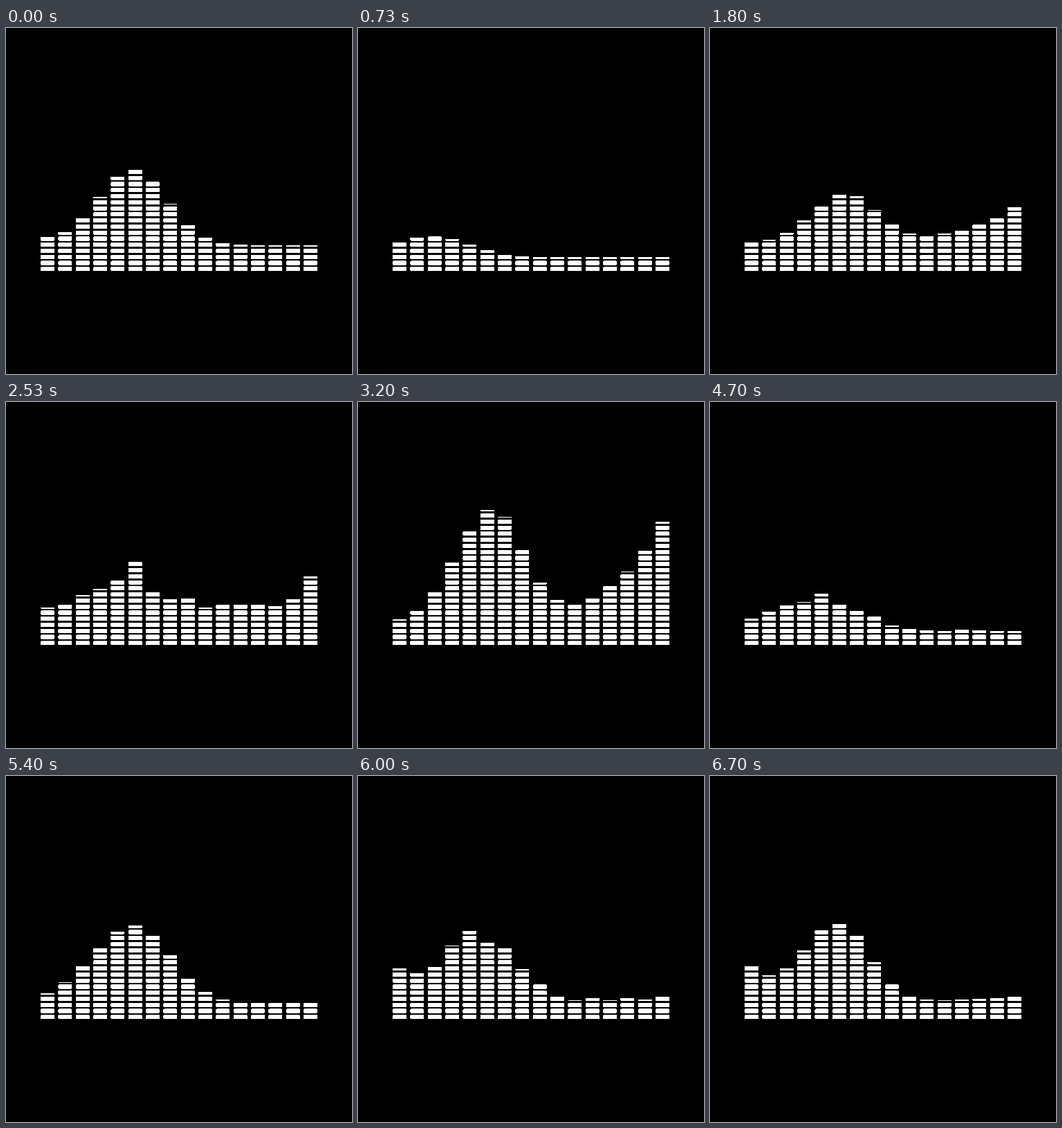
An HTML page that plays this animation: 500 px wide and 500 px high, repeating every 6.73 s.

```html
<!DOCTYPE html>
<html lang="en">
<head>
<meta charset="utf-8">
<title>Equalizer</title>
<style>
  html, body { margin: 0; width: 100%; height: 100%; overflow: hidden; background: #000; }
  svg { display: block; width: 100vw; height: 100vh; shape-rendering: crispEdges; }
</style>
</head>
<body>
<svg viewBox="0 0 500 500"></svg>
<script>
const LOOP = 6730, BEAT = 700, BASE = 351, BARS = 16, ROWS = 28;
const svg = document.querySelector('svg');

// Bar heights: a bell around bar `at`, plus lifts that fade in from both ends.
function pose({ floor, amp, at, rise, fall, left = 0, right = 0 }) {
  return Array.from({ length: BARS }, (_, i) => {
    const width = i < at ? rise : fall;
    return floor + amp * Math.exp(-(((i - at) / width) ** 2))
      + left * Math.exp(-i / 1.5) + right * Math.exp((i - BARS + 1) / 3);
  });
}

const hill = pose({ floor: 37, amp: 109, at: 4.9, rise: 2.8, fall: 2.7, left: 7 });
const valley = pose({ floor: 40, amp: 70, at: 5.4, rise: 2.7, fall: 2.4, right: 52 });
const loud = pose({ floor: 30, amp: 161, at: 5.3, rise: 2.9, fall: 2.4, right: 148 });
const dome = pose({ floor: 22, amp: 113, at: 5, rise: 3.5, fall: 2.9, right: 3 });
const lift = pose({ floor: 25, amp: 113, at: 5, rise: 2.8, fall: 2.4, left: 46, right: 7 });
const hush = pose({ floor: 20, amp: 30, at: 1.8, rise: 3, fall: 3 });
const calm = pose({ floor: 20, amp: 25, at: 2.2, rise: 4.3, fall: 4.3, right: 4 });

const scale = (bars, k) => bars.map(h => h * k);
const key = (time, bars) => ({ time, bars });

const keys = [
  key(0, hill), key(730, hush), key(1800, valley), key(3200, loud),
  key(4000, calm), key(5400, dome), key(6700, lift), key(LOOP, hill)
];

// Every beat swells to its peak level and drops back before the next one.
const swells = [hill, valley, loud, dome, lift];
const peaks = [154, 213, 190, 190, 215, 188, 234, 190, 190, 146];
peaks.forEach((peak, n) => {
  const bars = swells[n >> 1];
  keys.push(key(n * BEAT + 250, scale(bars, peak / Math.max(...bars))));
  if (n) keys.push(key(n * BEAT - 100, scale(hush, .8)));
});
keys.sort((a, b) => a.time - b.time);

function rect(attrs) {
  const el = document.createElementNS('http://www.w3.org/2000/svg', 'rect');
  for (const name in attrs) el.setAttribute(name, attrs[name]);
  return svg.appendChild(el);
}

const barX = i => 50.17 + 25.325 * i;

for (let i = 0; i < BARS; i++) {
  for (let r = 0; r < ROWS; r++) {
    rect({ x: barX(i), y: 345.26 - 8.775 * r, width: 20, height: 6.16, rx: 1.2, fill: '#fff' });
  }
}

// Black covers hide everything above each bar's level.
const covers = Array.from({ length: BARS }, (_, i) =>
  rect({ x: barX(i) - 2, y: 0, width: 24, height: 0, fill: '#000' }));

const noise = n => {
  const v = Math.sin(n * 12.9898) * 43758.5453;
  return v - Math.floor(v);
};

// 25 steps per second shown on a 30 Hz grid.
function snap(t) {
  const part = t % 200;
  return t - part + [170, 130, 100, 70, 0].find(s => s <= part);
}

// Each bar eases at its own slightly uneven pace.
function level(bar, k, t) {
  const from = keys[k], to = keys[k + 1];
  const pace = .75 + .5 * noise(k * BARS + bar + 1);
  const u = ((t - from.time) / (to.time - from.time)) ** pace;
  const ease = (1 - Math.cos(Math.PI * u)) / 2;
  return from.bars[bar] + (to.bars[bar] - from.bars[bar]) * ease;
}

function draw(now) {
  const t = snap(now % LOOP);
  const k = keys.findIndex((from, n) => t >= from.time && t < keys[n + 1].time);
  covers.forEach((el, i) => el.setAttribute('height', Math.round(BASE - level(i, k, t))));
}

const start = performance.now();
function tick() {
  draw(performance.now() - start);
  requestAnimationFrame(tick);
}
tick();
</script>
</body>
</html>
```
